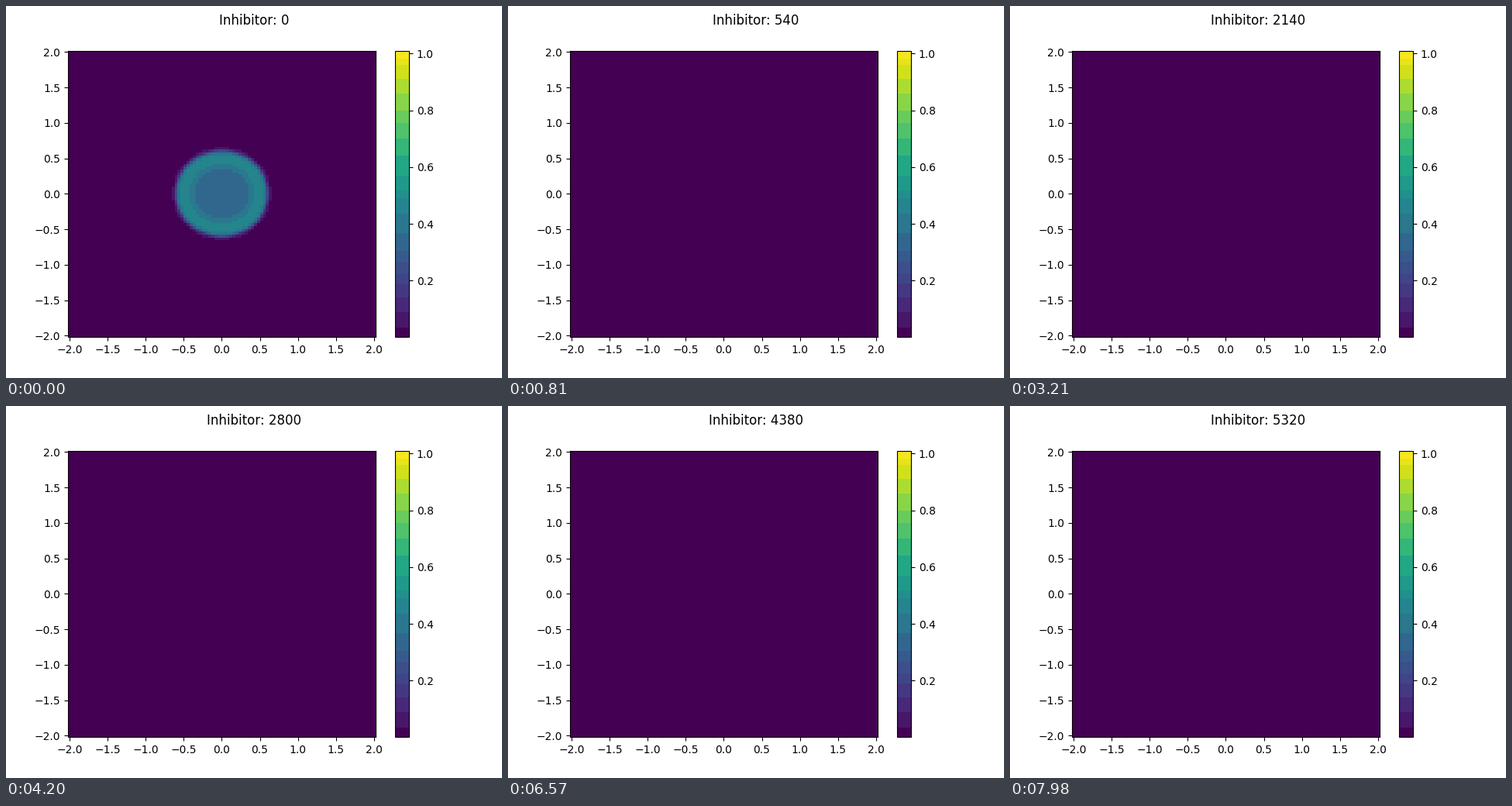
A matplotlib script for the animation above (8000 ms loop, 640 by 480 pixels).

```python
import numpy as np
import matplotlib.pyplot as plt
from matplotlib.animation import FuncAnimation
from matplotlib.colors import ListedColormap

INTERVAL = 20          # ms
FRAMES = 400
STEP_MS = 30           # the picture advances once per step
COUNT_PER_STEP = 20
V_MIN, V_MAX = 0.001, 1.0105
SHADES = 370

# Upper edge of each colour band, in shades from the bottom of the scale
EDGES = [12, 32, 51, 69, 82, 97, 111, 134, 159, 179, 189, 208,
         234, 256, 276, 293, 315, 334, 352, 360, 370]


def banded_viridis():
    edges = np.array([0] + EDGES)
    mids = (edges[:-1] + edges[1:]) / 2 / SHADES
    mids[0] = 0
    band = np.searchsorted(edges, np.arange(SHADES), side="right") - 1
    return ListedColormap(plt.get_cmap("viridis")(mids)[band])


axis = np.linspace(-2, 2, 101)
X, Y = np.meshgrid(axis, axis)
R = np.hypot(X, Y)


def soft_disc(radius, width):
    return 0.5 * (1 - np.tanh(1.2 * (R - radius) / width))


def inhibitor(step):
    """A ring-shaped spot that spreads by diffusion while it decays."""
    t = step * STEP_MS / 1000
    spread = 0.25 * t
    disc = 0.475 * soft_disc(0.6, np.sqrt(0.002 + spread))
    dip = 0.14 * soft_disc(0.395, np.sqrt(0.0076 + spread))
    return (disc - dip) * np.exp(-t / 0.18)


plt.rcParams["font.family"] = "DejaVu Sans"
fig, ax = plt.subplots(figsize=(6.4, 4.8), dpi=100)
field = ax.imshow(inhibitor(0), cmap=banded_viridis(), vmin=V_MIN, vmax=V_MAX,
                  origin="lower", extent=(-2.02, 2.02, -2.02, 2.02),
                  aspect="auto", interpolation="nearest")
fig.colorbar(field, ax=ax)
title = fig.suptitle("Inhibitor: 0")


def update(frame):
    step = (frame * INTERVAL + INTERVAL // 2) // STEP_MS
    field.set_data(inhibitor(step))
    title.set_text(f"Inhibitor: {step * COUNT_PER_STEP}")
    return field, title


anim = FuncAnimation(fig, update, frames=FRAMES, interval=INTERVAL,
                     init_func=lambda: update(0), repeat=True,
                     repeat_delay=0, blit=False)
plt.show()
```
